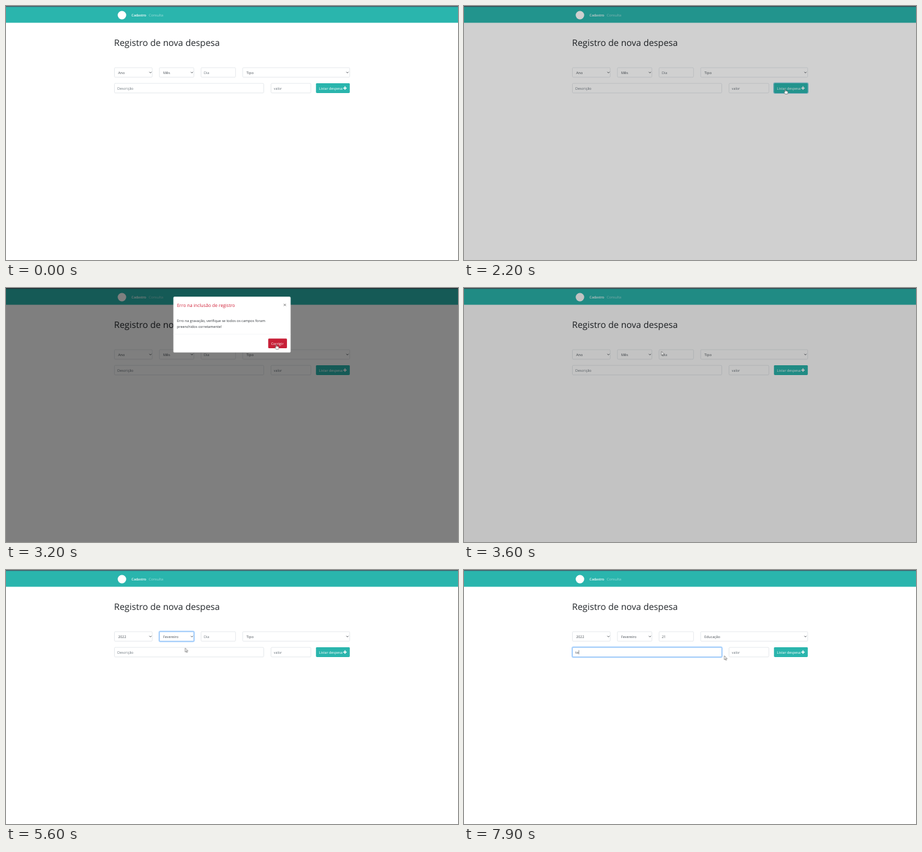
These frames come from a looping animation (690x388 px, 8 s). An HTML page:

```html
<!DOCTYPE html>
<html lang="pt-BR">
<head>
<meta charset="utf-8">
<title>Registro de nova despesa</title>
<style>
html, body { margin: 0; width: 100%; height: 100%; overflow: hidden; background: #fff; }
svg { display: block; width: 690px; height: 388px; }
text { font: 5.4px "Open Sans", "Noto Sans", sans-serif; text-rendering: geometricPrecision; fill: #495057; }
.hint { fill: #6c757d; }
.on-color { fill: #fff; }
.box { fill: #fff; stroke: #ced4da; stroke-width: .5; }
.ring { fill: none; stroke: #007bff; stroke-opacity: .28; stroke-width: 1.5; }
.edge { fill: none; stroke: #80bdff; stroke-width: .7; }
.chevron { fill: none; stroke: #343a40; stroke-width: .8; }

/* 1% = 80 ms; most states switch hard */
.a { animation: 8s step-end -5ms infinite; }
.linear { animation-timing-function: linear; }

@keyframes year-off { 0% { opacity: 1 } 55%, 100% { opacity: 0 } }
@keyframes year-on { 0% { opacity: 0 } 55%, 100% { opacity: 1 } }
@keyframes month-off { 0% { opacity: 1 } 68.75%, 100% { opacity: 0 } }
@keyframes month-on { 0% { opacity: 0 } 68.75%, 100% { opacity: 1 } }
@keyframes day-off { 0% { opacity: 1 } 75%, 100% { opacity: 0 } }
@keyframes day-1 { 0% { opacity: 0 } 75%, 100% { opacity: 1 } }
@keyframes day-2 { 0% { opacity: 0 } 77.5%, 100% { opacity: 1 } }
@keyframes type-off { 0% { opacity: 1 } 87.5%, 100% { opacity: 0 } }
@keyframes type-on { 0% { opacity: 0 } 87.5%, 100% { opacity: 1 } }
@keyframes desc-off { 0% { opacity: 1 } 95%, 100% { opacity: 0 } }
@keyframes desc-1 { 0% { opacity: 0 } 95%, 100% { opacity: 1 } }
@keyframes desc-2 { 0% { opacity: 0 } 97.5%, 100% { opacity: 1 } }
@keyframes caret {
  0% { opacity: 0; transform: translateX(0) }
  91.25% { opacity: 1; transform: translateX(0) }
  95% { opacity: 1; transform: translateX(2px) }
  97.5%, 100% { opacity: 1; transform: translateX(5px) }
}

@keyframes focus-add { 0%, 28.75%, 100% { opacity: 0 } 26.25% { opacity: 1 } }
@keyframes focus-year { 0%, 63.75%, 100% { opacity: 0 } 52.5% { opacity: 1 } }
@keyframes focus-month { 0%, 73.75%, 100% { opacity: 0 } 63.75% { opacity: 1 } }
@keyframes focus-day { 0%, 81.25%, 100% { opacity: 0 } 73.75% { opacity: 1 } }
@keyframes focus-type { 0%, 91.25%, 100% { opacity: 0 } 81.25% { opacity: 1 } }
@keyframes focus-desc { 0% { opacity: 0 } 91.25%, 100% { opacity: 1 } }

@keyframes dim {
  0%, 46.25%, 100% { opacity: 0 }
  27.5% { opacity: .184 }
  28.75% { opacity: .5 }
  45% { opacity: .235 }
}
@keyframes dialog {
  0% { opacity: 0; transform: translateY(-18px) }
  27.5% { opacity: 0; transform: translateY(-18px); animation-timing-function: steps(4) }
  32.5% { opacity: 1; transform: none }
  41.25% { opacity: 1; transform: none; animation-timing-function: steps(2) }
  43.75%, 100% { opacity: 0; transform: translateY(-18px) }
}

@keyframes track {
  0% { transform: translate(540px, 170px); opacity: 0 }
  17.5% { transform: translate(540px, 170px); opacity: 1; animation-timing-function: steps(5) }
  23.75% { transform: translate(490.4px, 127px); opacity: 1 }
  28.75% { transform: translate(490.4px, 127px); opacity: 1; animation-timing-function: steps(7) }
  37.5% { transform: translate(414px, 87.5px); opacity: 1 }
  40% { transform: translate(412.5px, 86.2px); opacity: 1 }
  41.25% { transform: translate(412.5px, 86.2px); opacity: 1; animation-timing-function: steps(3) }
  45% { transform: translate(301.5px, 96.8px); opacity: 1; animation-timing-function: steps(4) }
  50% { transform: translate(200px, 102px); opacity: 1 }
  52.5% { transform: translate(200px, 102px); opacity: 1; animation-timing-function: steps(4) }
  57.5% { transform: translate(210.3px, 122px); opacity: 1 }
  60% { transform: translate(210.3px, 122px); opacity: 1; animation-timing-function: steps(3) }
  63.75% { transform: translate(262px, 101px); opacity: 1; animation-timing-function: steps(4) }
  68.75% { transform: translate(258px, 125px); opacity: 1; animation-timing-function: steps(4) }
  73.75% { transform: translate(320px, 102px); opacity: 1 }
  78.75% { transform: translate(320px, 102px); opacity: 1; animation-timing-function: steps(2) }
  81.25% { transform: translate(400px, 102px); opacity: 1 }
  82.5% { transform: translate(389.8px, 131.6px); opacity: 1 }
  86.25% { transform: translate(389.8px, 131.6px); opacity: 1 }
  87.5% { transform: translate(385px, 120px); opacity: 1; animation-timing-function: steps(3) }
  91.25% { transform: translate(369px, 128px); opacity: 1 }
  98.75%, 100% { transform: translate(397.4px, 131px); opacity: 1 }
}
@keyframes arrow {
  0%, 30%, 41.25%, 61.25%, 78.75%, 98.75%, 100% { opacity: 1 }
  23.75%, 37.5%, 56.25%, 71.25%, 88.75% { opacity: 0 }
}
@keyframes hand {
  0%, 30%, 41.25%, 100% { opacity: 0 }
  23.75%, 37.5% { opacity: 1 }
}
@keyframes beam {
  0%, 61.25%, 78.75%, 98.75%, 100% { opacity: 0 }
  56.25%, 71.25%, 88.75% { opacity: 1 }
}
</style>
</head>
<body>
<svg viewBox="0 0 690 388">
  <rect width="690" height="388" fill="#fff"/>
  <rect width="690" height="25.6" fill="#2ab5ad"/>
  <rect width="690" height="1.3" fill="#4b5a66"/>
  <circle cx="177" cy="14" r="6.5" fill="#fff"/>
  <text x="191.6" y="16" class="on-color" style="font-size:5.2px;font-weight:600">Cadastro</text>
  <text x="218" y="16" class="on-color" opacity=".55">Consulta</text>
  <text x="165" y="61.3" style="font-size:13.6px;fill:#212529">Registro de nova despesa</text>

  <g class="box">
    <rect x="165.5" y="94.2" width="57.7" height="14.6" rx="1.4"/>
    <rect x="234.2" y="94.2" width="52.6" height="14.6" rx="1.4"/>
    <rect x="297.8" y="94.2" width="52.6" height="14.6" rx="1.4"/>
    <rect x="361.3" y="94.2" width="163.4" height="14.6" rx="1.4"/>
    <rect x="165.5" y="118.2" width="228" height="14.6" rx="1.4"/>
    <rect x="404.6" y="118.2" width="60.8" height="14.6" rx="1.4"/>
  </g>
  <path class="chevron" d="M218.9 100.7l1.6 1.6 1.6-1.6M282.2 100.7l1.6 1.6 1.6-1.6M519.6 100.7l1.6 1.6 1.6-1.6"/>

  <text x="171.2" y="104" class="a" style="animation-name:year-off">Ano</text>
  <text x="171.2" y="104" class="a" style="animation-name:year-on">2022</text>
  <text x="240" y="104" class="a" style="animation-name:month-off">Mês</text>
  <text x="240" y="104" class="a" style="animation-name:month-on">Fevereiro</text>
  <text x="302" y="103.7" class="hint a" style="animation-name:day-off">Dia</text>
  <text x="302" y="103.7" class="a" style="animation-name:day-1">2<tspan class="a" style="animation-name:none"></tspan></text>
  <text x="305.1" y="103.7" class="a" style="animation-name:day-2">1</text>
  <text x="367" y="104" class="a" style="animation-name:type-off">Tipo</text>
  <text x="367" y="104" class="a" style="animation-name:type-on">Educação</text>
  <text x="170" y="127.5" class="hint a" style="animation-name:desc-off">Descrição</text>
  <text x="170" y="127.5" class="a" style="animation-name:desc-1">t</text>
  <text x="171.9" y="127.5" class="a" style="animation-name:desc-2">e</text>
  <text x="408.8" y="127.5" class="hint">valor</text>
  <rect x="169.9" y="122.4" width=".5" height="6.4" fill="#343a40" class="a" style="animation-name:caret"/>

  <rect x="473.2" y="117.9" width="51.6" height="15" rx="1.4" fill="#2ab5ad"/>
  <text x="477.8" y="127.5" class="on-color">Listar despesa</text>
  <path d="M517.5 122.8v5.2M514.9 125.4h5.2" stroke="#fff" stroke-width="1.5"/>

  <rect x="472.7" y="117.4" width="52.6" height="16" rx="1.8" fill="none" stroke="#2aa9c5" stroke-opacity=".55" stroke-width="1.3" class="a" style="animation-name:focus-add"/>
  <g class="a" style="animation-name:focus-year">
    <rect class="ring" x="164.9" y="93.6" width="58.9" height="15.8" rx="1.8"/>
    <rect class="edge" x="165.5" y="94.2" width="57.7" height="14.6" rx="1.4"/>
  </g>
  <g class="a" style="animation-name:focus-month">
    <rect class="ring" x="233.6" y="93.6" width="53.8" height="15.8" rx="1.8"/>
    <rect class="edge" x="234.2" y="94.2" width="52.6" height="14.6" rx="1.4"/>
  </g>
  <g class="a" style="animation-name:focus-day">
    <rect class="ring" x="297.2" y="93.6" width="53.8" height="15.8" rx="1.8"/>
    <rect class="edge" x="297.8" y="94.2" width="52.6" height="14.6" rx="1.4"/>
  </g>
  <g class="a" style="animation-name:focus-type">
    <rect class="ring" x="360.7" y="93.6" width="164.6" height="15.8" rx="1.8"/>
    <rect class="edge" x="361.3" y="94.2" width="163.4" height="14.6" rx="1.4"/>
  </g>
  <g class="a" style="animation-name:focus-desc">
    <rect class="ring" x="164.9" y="117.6" width="229.2" height="15.8" rx="1.8"/>
    <rect class="edge" x="165.5" y="118.2" width="228" height="14.6" rx="1.4"/>
  </g>

  <rect width="690" height="388" class="a" style="animation-name:dim"/>

  <g class="a" style="animation-name:dialog">
    <rect x="255.5" y="13.2" width="179" height="85.4" rx="1.7" fill="#fff"/>
    <path d="M255.5 70.5h179" stroke="#e9ecef" stroke-width=".4"/>
    <text x="261" y="28.8" style="font-size:6.95px;fill:#d02037">Erro na inclusão de registro</text>
    <path d="M424 24.2l3.2 3.2M427.2 24.2l-3.2 3.2" stroke="#6b6b6b" stroke-width=".9"/>
    <text x="261" y="51.8" style="fill:#33383d">Erro na gravação, verifique se todos os campos foram</text>
    <text x="261" y="61.3" style="fill:#33383d">preenchidos corretamente!</text>
    <rect x="400.3" y="77.3" width="28.6" height="14.8" rx="1.4" fill="#c71f37"/>
    <text x="404.7" y="86.9" class="on-color">Corrigir</text>
  </g>

  <g class="a" style="animation-name:track">
    <path d="M0 0V6.1L1.4 4.8 2.4 7 3.3 6.6 2.3 4.4H4.3Z" fill="#fff" stroke="#222" stroke-width=".45" class="a" style="animation-name:arrow"/>
    <path d="M-.6 .3Q0-.4.6.3V2.8Q1.4 2.3 1.8 3 2.6 2.6 3 3.3 3.9 3 4 4V5.4Q3.9 6.4 3.3 7.4H-.1Q-.8 6.2-2 4.5-2-3.6-.6 4.4Z" fill="none" stroke="none"/>
    <path d="M-.6.4Q0-.4.6.4V2.7Q1.5 2.3 1.8 3.1 2.6 2.7 3 3.4 3.9 3.2 4 4.2V5.4Q3.9 6.4 3.3 7.5H-.1Q-.9 6.2-2 4.7-1.7 3.5-.6 4.5Z" fill="#fff" stroke="#222" stroke-width=".45" class="a" style="animation-name:hand"/>
    <path d="M-1.2-2.9H1.2M0-2.9V2.9M-1.2 2.9H1.2" fill="none" stroke="#333" stroke-width=".6" class="a" style="animation-name:beam"/>
  </g>
</svg>
</body>
</html>
```
